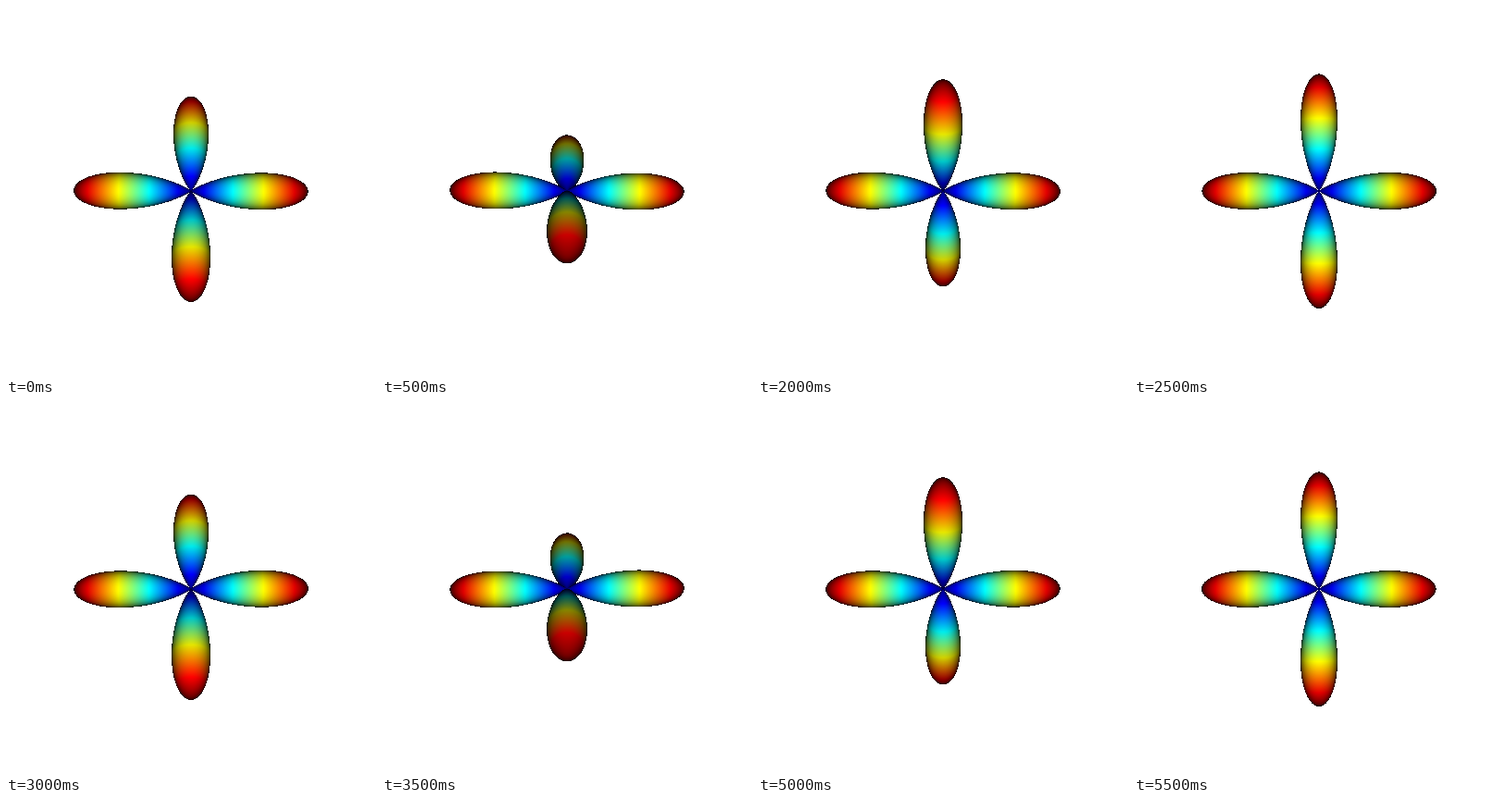
An HTML page with a canvas for the animation above (6 s loop, 400x400 px).

```html
<!DOCTYPE html>
<html lang="en">
<head>
<meta charset="utf-8">
<title>Four-lobed surface</title>
<style>
  html, body { margin: 0; width: 100%; height: 100%; overflow: hidden; background: #fff; }
  canvas { display: block; }
</style>
</head>
<body>
<canvas id="stage" width="400" height="400"></canvas>
<script>
const SIZE = 400, MID = SIZE / 2;
const RADIUS = 126.4;             // lobe length
const POWER = 3.5;                // lobe profile: r = cos(2 phi) ^ POWER
const CAMERA = 750;               // eye distance from the centre
const SKEW = 0.45 * Math.PI / 180; // lobes sit slightly off the turning axes
const STEP_MS = 500, POSES = 12;
const RINGS = 1100, SPOKES = 700;

const ctx = document.getElementById('stage').getContext('2d');
const cache = [];

const clamp = v => Math.max(0, Math.min(1, v));
const ramp = (v, peak) => clamp(1.5 - Math.abs(4 * v - peak));
const jet = v => [ramp(v, 3), ramp(v, 2), ramp(v, 1)];

// Points of the half profile with their normals and colours.
const profile = Array.from({ length: RINGS }, (_, i) => {
  const phi = i / RINGS * Math.PI / 4;
  const c = Math.cos(phi), s = Math.sin(phi);
  const r = Math.cos(2 * phi) ** POWER, dr = -2 * POWER * r * Math.tan(2 * phi);
  const nx = dr * s + r * c, ny = r * s - dr * c;
  const len = Math.hypot(nx, ny);
  return {
    x: RADIUS * r * c, y: RADIUS * r * s,
    nx: nx / len, ny: ny / len,
    color: jet(r)
  };
});

function drawLobe(data, depth, axis, u, v) {
  for (let j = 0; j < SPOKES; j++) {
    const a = (j + 0.5) / SPOKES * 2 * Math.PI;
    const ca = Math.cos(a), sa = Math.sin(a);
    const sx = u[0] * ca + v[0] * sa;
    const sy = u[1] * ca + v[1] * sa;
    const sz = u[2] * ca + v[2] * sa;
    for (const p of profile) {
      const x = axis[0] * p.x + sx * p.y;
      const y = axis[1] * p.x + sy * p.y;
      const z = axis[2] * p.x + sz * p.y;
      const zoom = CAMERA / (CAMERA - z);

      // Keep only points near a pixel centre, for crisp edges.
      const col = Math.floor(3 * (MID + x * zoom));
      const row = Math.floor(3 * (MID - y * zoom));
      if (col % 3 !== 1 || row % 3 !== 1) continue;

      const facing = -x * (axis[0] * p.nx + sx * p.ny)
        - y * (axis[1] * p.nx + sy * p.ny)
        + (CAMERA - z) * (axis[2] * p.nx + sz * p.ny);
      if (facing < 0) continue;

      const i = (row - 1) / 3 * SIZE + (col - 1) / 3;
      if (z <= depth[i]) continue;
      depth[i] = z;
      const light = 255 * facing / Math.hypot(x, y, CAMERA - z);
      for (let k = 0; k < 3; k++) data[4 * i + k] = p.color[k] * light;
    }
  }
}

function render(pose) {
  const image = ctx.createImageData(SIZE, SIZE);
  const depth = new Float32Array(SIZE * SIZE).fill(-1e9);
  image.data.fill(255);

  const angle = (pose + 1) / POSES * 2 * Math.PI + SKEW;
  const c = Math.cos(angle), s = Math.sin(angle);
  const ck = Math.cos(SKEW), sk = Math.sin(SKEW);
  const side = [ck, -sk * s, -sk * c];
  const upright = [0, -c, s];
  const front = [sk, ck * s, ck * c];
  for (const sign of [1, -1]) {
    drawLobe(image.data, depth, side.map(n => n * sign), upright, front);
    drawLobe(image.data, depth, upright.map(n => n * sign), side, front);
  }
  return image;
}

const start = performance.now();
let shown = -1;

function tick() {
  const pose = Math.floor((performance.now() - start) / STEP_MS) % POSES;
  if (pose !== shown) {
    cache[pose] = cache[pose] || render(pose);
    ctx.putImageData(cache[pose], 0, 0);
    shown = pose;
  }
  requestAnimationFrame(tick);
}
tick();
</script>
</body>
</html>
```
